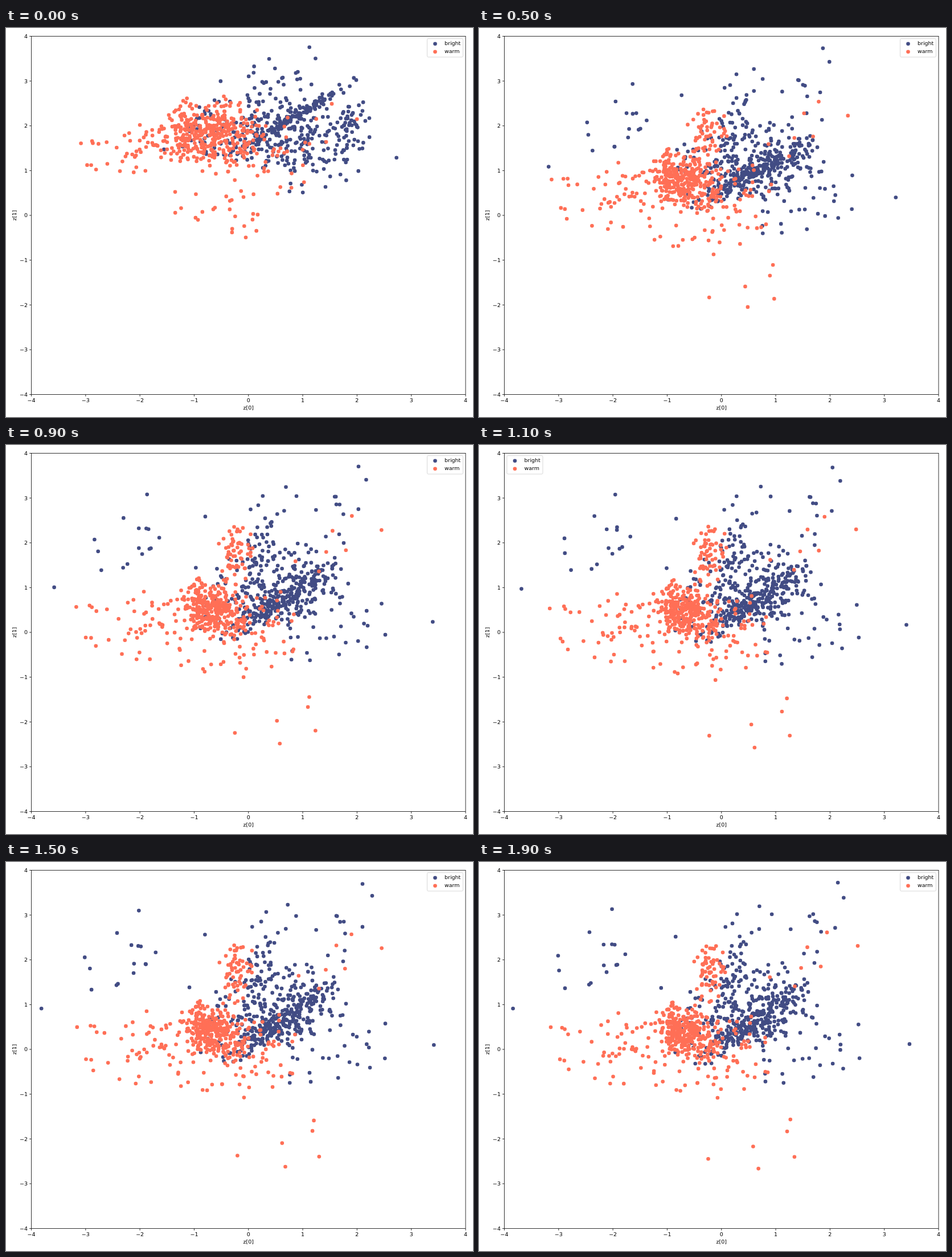
An HTML page with a canvas for the animation above (2000 ms loop, 820 by 683 pixels).

```html
<!DOCTYPE html>
<html lang="en">
<head>
<meta charset="utf-8">
<title>Latent space scatter</title>
<style>
  html, body { margin: 0; width: 100%; height: 100%; overflow: hidden; background: #fff; }
  canvas { display: block; width: 820px; height: 683px; }
</style>
</head>
<body>
<canvas id="plot" width="820" height="683"></canvas>
<script>
const ctx = document.getElementById('plot').getContext('2d');
const BLUE = '#424c84', WARM = '#ff6f56';
const BOX = { x: 44.5, y: 14.5, w: 762.5, h: 629 };
const STEP_MS = 100, STEPS = 20;
const SETTLE = 4; // steps
const DOT = 3.32;

const px = x => BOX.x + (x + 4) / 8 * BOX.w;
const py = y => BOX.y + (4 - y) / 8 * BOX.h;

let seed = 20417;
function rand() {
  seed = (seed + 0x6D2B79F5) | 0;
  let v = Math.imul(seed ^ (seed >>> 15), 1 | seed);
  v = (v + Math.imul(v ^ (v >>> 7), 61 | v)) ^ v;
  return ((v ^ (v >>> 14)) >>> 0) / 4294967296;
}
// Bell-shaped, unit deviation, bounded to ±3
const bell = () => (rand() + rand() + rand() - 1.5) * 2;

const clouds = [];
// A pose is centre x, centre y, spread x, spread y and slope
function cloud(color, count, from, to) {
  const points = Array.from({ length: count }, () => ({
    a: bell(), b: bell(), phase: rand() * 6.28, rate: 0.4 + rand() * 0.5
  }));
  clouds.push({ color, points, from, to });
}

// Ridge, body, column, right flank, hidden part, then the sparse edges
cloud(BLUE, 125, [.8, 2.16, .52, .06, .73], [.42, .4, .31, .16, .6]);
cloud(BLUE, 165, [.8, 1.7, .55, .36, .1], [.7, .85, .42, .42, .25]);
cloud(BLUE, 55, [.35, 2.2, .35, .45, 0], [.22, 1.55, .2, .42, 0]);
cloud(BLUE, 42, [1.85, 2, .18, .3, 0], [1.2, 1.05, .2, .22, .3]);
cloud(BLUE, 45, [-.6, 1.9, .38, .33, 0], [-.3, .5, .33, .5, 0]);
cloud(BLUE, 24, [.4, 3, .45, .36, 0], [.8, 2.7, .8, .4, .1]);
cloud(BLUE, 30, [1.2, 1.1, .55, .35, 0], [1.4, -.1, .75, .4, 0]);
cloud(BLUE, 17, [-.7, 2, .35, .28, 0], [-2.3, 2, .65, .6, 0]);

// Core, upper arm, right side, left side, lower rim, then the far points
cloud(WARM, 290, [-.8, 1.8, .4, .35, 0], [-.67, .36, .24, .28, -.25]);
cloud(WARM, 60, [-.35, 1.85, .25, .3, 0], [-.21, 1.66, .13, .28, .3]);
cloud(WARM, 52, [.3, 1.5, .5, .4, 0], [.25, .15, .38, .35, 0]);
cloud(WARM, 62, [-1.9, 1.55, .55, .28, .2], [-1.8, .05, .62, .42, 0]);
cloud(WARM, 20, [-.5, .25, .45, .25, 0], [-.3, -.7, .5, .18, 0]);
cloud(WARM, 6, [-.1, -.3, .2, .15, 0], [.5, -2.3, .75, .3, 0]);
cloud(WARM, 7, [1.5, 1.6, .5, .5, 0], [1.9, 1.8, .6, .45, 0]);

function disc(x, y) {
  ctx.beginPath();
  ctx.arc(x, y, DOT, 0, Math.PI * 2);
  ctx.fill();
}

function drawPoints(color, step) {
  const u = 1 - Math.exp(-step / SETTLE);
  ctx.fillStyle = color;
  for (const { points, from, to } of clouds.filter(c => c.color === color)) {
    const [cx, cy, sx, sy, slope] = from.map((v, i) => v + (to[i] - v) * u);
    for (const p of points) {
      const wobble = 0.025 * Math.sin(step * p.rate + p.phase);
      const dx = sx * p.a;
      disc(px(cx + dx + wobble), py(cy + slope * dx + sy * p.b + wobble));
    }
  }
}

function text(str, x, y, align) {
  ctx.textAlign = align;
  ctx.fillText(str, x, y);
}

function line(x1, y1, x2, y2) {
  ctx.beginPath();
  ctx.moveTo(x1, y1);
  ctx.lineTo(x2, y2);
  ctx.stroke();
}

function drawAxes() {
  ctx.strokeStyle = ctx.fillStyle = '#000';
  ctx.lineWidth = 0.8;
  ctx.strokeRect(BOX.x, BOX.y, BOX.w, BOX.h);
  const bottom = BOX.y + BOX.h;
  for (let v = -4; v <= 4; v++) {
    const label = String(v).replace('-', '\u2212');
    line(px(v), bottom, px(v), bottom + 3.4);
    line(BOX.x, py(v), BOX.x - 3.4, py(v));
    text(label, px(v), 657, 'center');
    text(label, 38, Math.round(py(v) + 3.46), 'right');
  }
  text('z[0]', 425.7, 670, 'center');
  ctx.save();
  ctx.translate(18, 329);
  ctx.rotate(-Math.PI / 2);
  text('z[1]', 0, 0, 'center');
  ctx.restore();
}

function drawLegend(left) {
  const x = left ? 49 : 739.5;
  ctx.beginPath();
  ctx.roundRect(x, 18.7, 63, 32.3, 2);
  ctx.fillStyle = 'rgba(255,255,255,0.8)';
  ctx.fill();
  ctx.strokeStyle = 'rgba(204,204,204,0.8)';
  ctx.lineWidth = 0.95;
  ctx.stroke();
  [['bright', BLUE], ['warm', WARM]].forEach(([name, color], i) => {
    ctx.fillStyle = color;
    disc(x + 14, 27.7 + i * 14);
    ctx.fillStyle = '#000';
    text(name, x + 30.5, 30 + i * 14, 'left');
  });
}

function draw(step) {
  ctx.fillStyle = '#fff';
  ctx.fillRect(0, 0, 820, 683);
  ctx.font = '9.49px "DejaVu Sans", sans-serif';
  ctx.save();
  ctx.beginPath();
  ctx.rect(BOX.x, BOX.y, BOX.w, BOX.h);
  ctx.clip();
  drawPoints(BLUE, step);
  drawPoints(WARM, step);
  ctx.restore();
  drawAxes();
  drawLegend(step >= 10 && step <= 12);
}

const start = performance.now();
let shown = -1;
function tick() {
  const step = Math.floor((performance.now() - start) / STEP_MS) % STEPS;
  if (step !== shown) draw(shown = step);
  requestAnimationFrame(tick);
}
tick();
</script>
</body>
</html>
```
